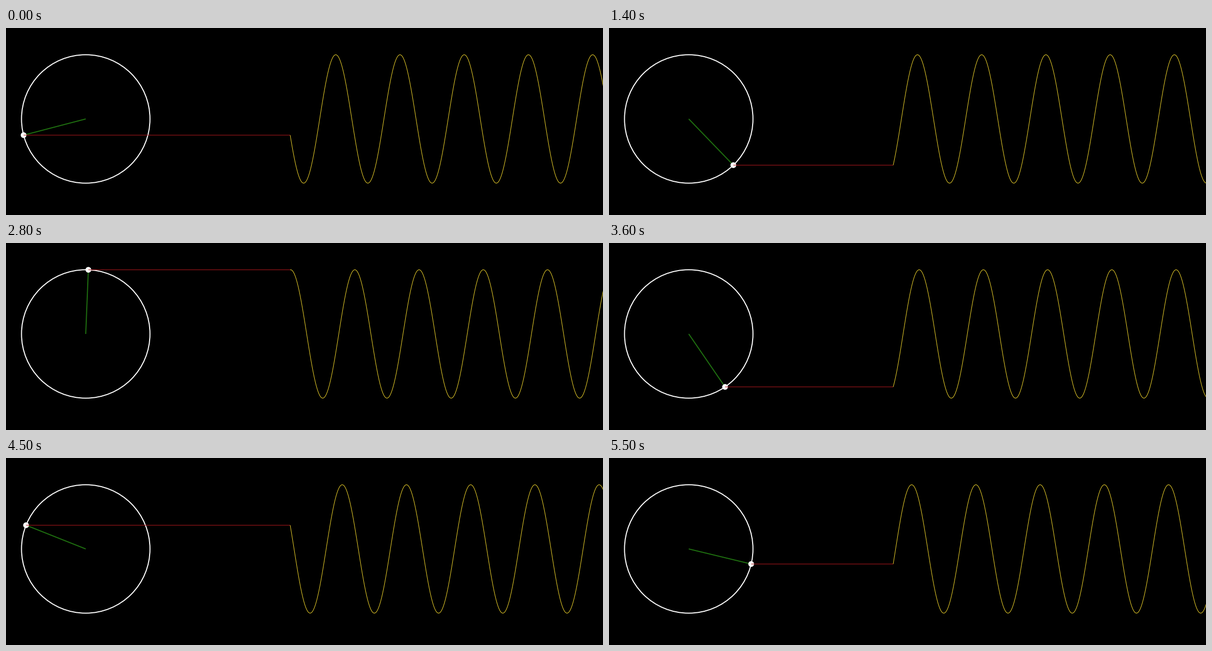
A matplotlib script that plays this animation: 1168x366 px, repeating every 5.6 s.

```python
import numpy as np
import matplotlib.pyplot as plt
from matplotlib.animation import FuncAnimation
from matplotlib.patches import Circle

W, H, DPI = 1168, 366, 100
PX = 72 / DPI                 # one pixel in points
FRAMES, INTERVAL = 56, 100

CX, CY = 156, 178             # centre of the circle
SCALE = 20                    # pixels per radian along the wave
R = 2 * np.pi * SCALE
WAVE_X = 556
STEP = 0.05                   # radians turned per tick
START = 3.3968

# The rotation advances in whole ticks at a slightly uneven pace.
KEY_FRAMES = [0, 14, 17, 18, 22, 24, 28, 36, 38, 42, 44, 45, 48, 55]
KEY_TICKS = [0, 84, 99, 103, 128, 143, 163, 213, 223, 244, 258, 264, 284, 324]

plt.rcParams["path.simplify"] = False
fig = plt.figure(figsize=(W / DPI, H / DPI), dpi=DPI, facecolor="black")
ax = fig.add_axes([0, 0, 1, 1])
ax.set_xlim(0, W)
ax.set_ylim(H, 0)
ax.axis("off")


def stroke(color, width, z):
    line, = ax.plot([], [], color=color, lw=width * PX, zorder=z,
                    solid_capstyle="butt", snap=False)
    return line


ax.add_patch(Circle((CX, CY), R, fill=False, ec="white", lw=2 * PX, zorder=1))
arm = stroke("#1f7010", 2, 2)
dot = ax.add_patch(Circle((CX, CY), 5.6, fc="white", lw=0, zorder=3))
link = stroke("#b4181e", 1, 4)
wave = stroke("#f0d52c", 1, 5)

xs = np.arange(WAVE_X, W + 2)


def update(frame):
    ticks = np.round(np.interp(frame, KEY_FRAMES, KEY_TICKS))
    angle = START - STEP * ticks
    x, y = CX + R * np.cos(angle), CY - R * np.sin(angle)
    arm.set_data([CX, x], [CY, y])
    dot.center = x, y
    link.set_data([x, WAVE_X], [y, y])
    wave.set_data(xs, CY - R * np.sin(angle + (xs - WAVE_X) / SCALE))
    return arm, dot, link, wave


anim = FuncAnimation(fig, update, frames=FRAMES, interval=INTERVAL,
                     repeat=True, repeat_delay=0)
plt.show()
```
